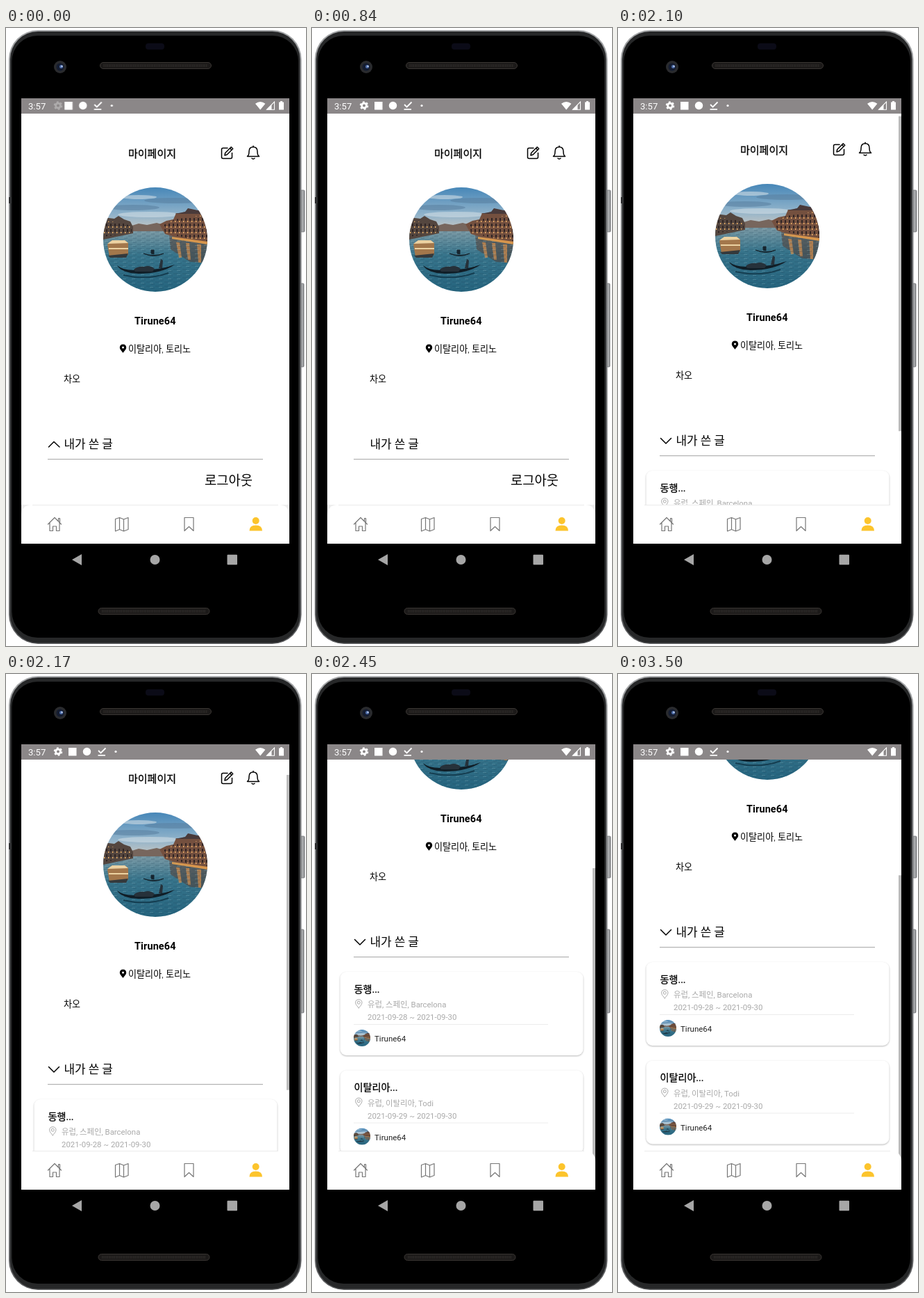
An HTML page for the animation above (3570 ms loop, 432 by 888 pixels).

```html
<!DOCTYPE html>
<html lang="ko">
<head>
<meta charset="utf-8">
<title>My page</title>
<style>
  @property --scroll { syntax: "<number>"; inherits: true; initial-value: 0; }
  html, body { margin: 0; width: 100%; height: 100%; overflow: hidden; background: #fff; }
  svg { display: block; width: 432px; height: 888px; animation: scroll 3570ms step-end infinite; }
  text { font-family: Roboto, "Noto Sans CJK KR", "Noto Sans CJK", sans-serif; font-size: 13.1px; }
  .mid { text-anchor: middle; }
  .title { font-size: 15px; stroke: #000; stroke-width: .3px; }
  .user { font-size: 14.4px; font-weight: 700; letter-spacing: .15px; }
  .light { font-weight: 300; }
  .h { font-size: 16.9px; }
  .out { font-size: 18.8px; }
  .card-title { font-size: 14.1px; stroke: #000; stroke-width: .3px; }
  .meta { font-size: 11.4px; fill: #a9a9a9; }
  .small { font-size: 11.5px; }
  .line { fill: none; stroke: #000; stroke-width: 1.5; stroke-linecap: round; stroke-linejoin: round; }
  .tab { fill: none; stroke: #777; stroke-width: 1.2; stroke-linejoin: round; stroke-linecap: round; }
  .card { fill: #fff; filter: drop-shadow(0 1.2px 1.2px rgba(0, 0, 0, .28)); }

  .page { transform: translateY(calc(var(--scroll) * -1px)); }
  .thumb { transform: translateY(calc(var(--scroll) * .7326px)); }
  .anim { animation: 3570ms step-end infinite; }
  .gear { animation-name: gear; }
  .notes { animation-name: notes; }
  .up { animation-name: up; }
  .down { animation-name: down; }
  .closed { animation-name: closed; }
  .opened { animation-name: opened; }
  .thumb-box { animation-name: bar; }

  @keyframes gear { 0% { opacity: .3 } 1.96% { opacity: .7 } 3.92%, 100% { opacity: 1 } }
  @keyframes notes {
    0% { transform: translateX(-5.7px) }
    1.96% { transform: translateX(-2.4px) }
    3.92%, 100% { transform: none }
  }
  @keyframes up { 0% { opacity: 1 } 15.68% { opacity: .2 } 23.52%, 100% { opacity: 0 } }
  @keyframes down {
    0% { opacity: 0 } 25.49% { opacity: .08 } 27.45% { opacity: .33 } 29.41% { opacity: .66 }
    31.37% { opacity: .93 } 33.33%, 100% { opacity: 1 }
  }
  @keyframes closed { 0% { opacity: 1 } 45.09%, 100% { opacity: 0 } }
  @keyframes opened { 0% { opacity: 0 } 45.09%, 100% { opacity: 1 } }
  @keyframes bar { 0% { opacity: 0 } 58.82%, 100% { opacity: 1 } }
  @keyframes scroll {
    0% { --scroll: 0 } 58.82% { --scroll: 5 } 60.78% { --scroll: 30 } 62.74% { --scroll: 89 }
    64.7% { --scroll: 150.5 } 66.66% { --scroll: 190 } 68.62% { --scroll: 213 }
    70.58% { --scroll: 223 } 72.54%, 100% { --scroll: 227 }
  }
</style>
</head>
<body>
<svg viewBox="0 0 432 888" xmlns="http://www.w3.org/2000/svg">
  <defs>
    <linearGradient id="rim" x2="0" y2="1">
      <stop offset="0" stop-color="#a4a6a8"/><stop offset=".12" stop-color="#8a8c8e"/>
      <stop offset=".9" stop-color="#6c6e70"/><stop offset="1" stop-color="#58595b"/>
    </linearGradient>
    <linearGradient id="button">
      <stop offset="0" stop-color="#5d5f61"/><stop offset=".7" stop-color="#b3b5b7"/><stop offset="1" stop-color="#77797b"/>
    </linearGradient>
    <linearGradient id="sky" x2="0" y2="1">
      <stop offset="0" stop-color="#4787b8"/><stop offset=".55" stop-color="#8fb2ca"/><stop offset="1" stop-color="#dccfc0"/>
    </linearGradient>
    <linearGradient id="water" x2="0" y2="1">
      <stop offset="0" stop-color="#7d9aa5"/><stop offset=".4" stop-color="#37748b"/><stop offset="1" stop-color="#25647e"/>
    </linearGradient>
    <pattern id="windows" width="6" height="8" patternUnits="userSpaceOnUse">
      <path d="M1 1h2v4h-2z" fill="#2f2524"/><path d="M4 5h1.4v2h-1.4z" fill="#f0b468"/>
    </pattern>
    <pattern id="ripples" width="13" height="6" patternUnits="userSpaceOnUse">
      <path d="M0 1h6M7 4h5" stroke="#173f55" stroke-width=".8" opacity=".35"/>
      <path d="M5 2.5h5" stroke="#8fb9c5" stroke-width=".7" opacity=".4"/>
    </pattern>
    <clipPath id="round"><circle r="75"/></clipPath>
    <clipPath id="view"><path d="M22 123h386v618h-386z"/></clipPath>

    <g id="photo" clip-path="url(#round)">
      <path d="M-75-75h150v70h-150z" fill="url(#sky)"/>
      <g fill="#587f9f" opacity=".55">
        <ellipse cx="-32" cy="-46" rx="38" ry="4"/><ellipse cx="28" cy="-56" rx="44" ry="4"/>
      </g>
      <g fill="#cfdde5" opacity=".6">
        <ellipse cx="-8" cy="-36" rx="46" ry="4"/><ellipse cx="-24" cy="-61" rx="26" ry="3"/>
      </g>
      <path d="M-75-14h150v90h-150z" fill="url(#water)"/>
      <path d="M20-6L75 4V34L50 32 22 14z" fill="#54443d" opacity=".6"/>
      <path d="M30 4h5l3 22h-4zM44 5h5l2 24h-4zM60 7h6v26h-4z" fill="#e0924a" opacity=".65"/>
      <path d="M-75-14h150v90h-150z" fill="url(#ripples)"/>
      <path d="M-34-20l10-3 12 2 14-3 10 3v9h-46z" fill="#77665d"/>
      <path d="M-75-32l16 2 6-4 8 5 9 3 4 8v9l-43 9z" fill="#54463f"/>
      <path d="M6-22l10-5 10-2 4-9 13 1 4-6 14 2 14-2V6L48 2 14-8z" fill="#74503f"/>
      <path d="M28-37l15-3 4-5 14 3 14-3v8h-46z" fill="#493a3a"/>
      <path d="M-75-27l30 3 11 6v8l-41 6zM12-21l16-8 47-7V2L46-2 14-10z" fill="url(#windows)"/>
      <path d="M24-4L75 3v4L24-1z" fill="#f0a74f" opacity=".8"/>
      <path d="M-69 7l7-6h18l5 4v17l-27 3z" fill="#a3774b"/>
      <path d="M-69 6l7-5h18l5 4zM-67 12h28v2h-28z" fill="#ecd2a2"/>
      <path d="M-68 23l29-3-3 6h-23z" fill="#34393c"/>
      <path d="M-17 20q14 5 29 0q-14 7-29 0zM-6 20v-5h4v6z" fill="#16252e" stroke="#16252e"/>
      <path d="M-55 37q8 7 24 7 34 1 59-8-19 13-52 13-25-1-31-12z" fill="#101e27"/>
      <path d="M-31 43q6-5 15-4 8-3 15 3l-3 4h-25zM5 41l3-13 3 2-1 11z" fill="#26313a"/>
      <path d="M-46 51q34 8 65-3" fill="none" stroke="#153e51" stroke-width="2"/>
    </g>
    <path id="pin" d="M0-6.3C-3-6.3-4.7-4.3-4.7-1.8-4.7 1.4-1.2 3.6 0 6.3 1.2 3.6 4.7 1.4 4.7-1.8 4.7-4.3 3-6.3 0-6.3z"/>
    <g id="card-base">
      <rect class="card" x="40.5" y="641" width="350" height="120" rx="9"/>
      <g transform="translate(67.3 687)" fill="none" stroke="#aaa">
        <use href="#pin"/><circle cy="-1.8" r="2"/>
      </g>
      <path d="M60 716.5h280" stroke="#ececec"/>
      <use href="#photo" transform="translate(72 736) scale(.16)"/>
      <text class="small" x="90" y="741.2" fill="#222">Tirune64</text>
    </g>
    <g id="speaker">
      <rect width="160" height="9" rx="4.5" fill="#1c1a19" stroke="#3a3633"/>
      <path d="M5 4.5h150" stroke="#2b2826" stroke-width="4" stroke-dasharray="1.5 1"/>
    </g>
  </defs>

  <!-- phone -->
  <g fill="url(#button)" stroke="#5a5c5e" stroke-width=".6">
    <rect x="422" y="233" width="8" height="60" rx="1.5"/>
    <rect x="422" y="367" width="7" height="120" rx="1.5"/>
  </g>
  <rect x="4" y="3" width="421.5" height="882" rx="42" fill="url(#rim)"/>
  <rect x="6" y="5" width="417.5" height="878.5" rx="40" fill="#262728"/>
  <rect x="8.5" y="11" width="412.5" height="865" rx="37"/>
  <path d="M4 243h4v9h-4z" fill="#2f3032"/>
  <use href="#speaker" x="135.5" y="49.5"/>
  <use href="#speaker" x="133" y="833.5"/>
  <rect x="201" y="22" width="27" height="9" rx="4" fill="#0b0b17"/>
  <circle cx="78" cy="56" r="9" fill="#2a2b2e"/>
  <circle cx="78" cy="56" r="5.5" fill="#141c30"/>
  <circle cx="79.5" cy="55.5" r="2.5" fill="#4d6ca8"/>
  <circle cx="80.5" cy="55" r="1.2" fill="#c3d3ee"/>

  <!-- scrolling page -->
  <path d="M22 123h386v618h-386z" fill="#eee"/>
  <g clip-path="url(#view)">
    <g class="page">
      <path d="M22 100h386v585h-386z" fill="#fff"/>
      <path class="anim opened" d="M22 685h386v290h-386z" fill="#fff"/>
      <text class="title mid" x="210.5" y="185.5">마이페이지</text>
      <g class="line">
        <path d="M319 172.5h-6.500q-2 0-2 2v11q0 2 2 2h11q2 0 2-2v-6"/>
        <path d="M315 183l.7-3.5 8.5-8.5 2.5 2.5-8.5 8.5zM322.5 172.7l2.5 2.5"/>
        <path d="M347.500 184.5q2.5-1.5 2.5-7 0-6.5 6-6.5t6 6.5q0 5.5 2.5 7zM354 187.3q2 1.8 4 0M356 169.5v1"/>
      </g>
      <use href="#photo" x="215" y="304"/>
      <text class="user mid" x="214.8" y="426.3">Tirune64</text>
      <g transform="translate(168.5 460.7)">
        <use href="#pin"/><circle cy="-1.8" r="1.5" fill="#fff"/>
      </g>
      <text class="light" x="176" y="466.2">이탈리아, 토리노</text>
      <text class="light" x="83" y="509.3">차오</text>
      <path class="line anim up" d="M61.500 602l7.5-7.5 8 7.5"/>
      <path class="line anim down" d="M61.500 594.5l7.5 7.5 7.5-7.5"/>
      <text class="h light" x="83.5" y="604.3">내가 쓴 글</text>
      <path d="M60 619.7h310" stroke="#a2a2a2"/>
      <text class="out light anim closed" x="286" y="657.3">로그아웃</text>
      <g class="anim opened">
        <use href="#card-base"/>
        <text class="card-title" x="60.5" y="670.8">동행...</text>
        <text class="meta" x="80" y="692">유럽, 스페인, Barcelona</text>
        <text class="meta" x="80" y="710">2021-09-28 ~ 2021-09-30</text>
        <g transform="translate(0 141.5)">
          <use href="#card-base"/>
          <text class="card-title" x="60.5" y="670.8">이탈리아...</text>
          <text class="meta" x="80" y="692">유럽, 이탈리아, Todi</text>
          <text class="meta" x="80" y="710">2021-09-29 ~ 2021-09-30</text>
        </g>
      </g>
    </g>
    <g class="anim thumb-box"><path class="thumb" d="M404 123h4v452.7h-4z" fill="#bdbdbd"/></g>
  </g>

  <!-- tab bar -->
  <path d="M22 741v-40q0-16 16-16h354q16 0 16 16v40z" fill="#fff"/>
  <path d="M38 685.5h354" stroke="#ebebeb"/>
  <g class="tab">
    <path d="M60.5 713l9.5-9.5 9.5 9.5M63 711v11.5h4.5v-6.5h5v6.5h4.5v-11.5M75.5 708.5v-4h2v6"/>
    <path d="M157.5 705.5l6-2 6 2.5 6.5-2.5v17l-6.5 2.5-6-2.5-6 2.5zM163.5 703.5v17M169.5 706v17"/>
    <path d="M257 703.5h13v19l-6.5-6-6.5 6z"/>
  </g>
  <g fill="#fcc42c">
    <circle cx="359.7" cy="708" r="5"/>
    <path d="M350.5 722.5q0-8 9.200-8t9.300 8z"/>
  </g>

  <!-- status bar -->
  <path d="M22 101h386v22h-386z" fill="#8b8788"/>
  <g fill="#fff">
    <text x="32" y="116.6">3:57</text>
    <g class="anim gear" fill="none" stroke="#fff">
      <circle cx="75" cy="111.5" r="3.4" stroke-width="2.8"/>
      <circle cx="75" cy="111.5" r="5.3" stroke-width="2" stroke-dasharray="2.775"/>
    </g>
    <g class="anim notes">
      <rect x="90" y="106" width="11.5" height="11.5"/>
      <circle cx="116.5" cy="111.5" r="5.7"/>
      <path d="M133 110l3.5 3.5 7-7" fill="none" stroke="#fff" stroke-width="1.8"/>
      <path d="M132.5 116h10.5v1.7h-10.5z"/>
      <circle cx="158" cy="111.5" r="1.6"/>
    </g>
    <path d="M359 108.700q7.200-5.400 14.400 0l-7.200 8.800z"/>
    <path d="M386.5 106v11.2h-11z" fill="none" stroke="#fff" stroke-width="1.1"/>
    <path d="M382.5 110v7.5h-7.5z"/>
    <path d="M393 106.5h2v-1.5h3v1.5h2v11h-7z"/>
  </g>

  <!-- system buttons -->
  <g fill="#a6a6a6">
    <path d="M95 764l14-8v16z"/>
    <circle cx="214.5" cy="764" r="7"/>
    <rect x="318.5" y="756.8" width="14.5" height="14.5" rx="1"/>
  </g>
</svg>
</body>
</html>
```
